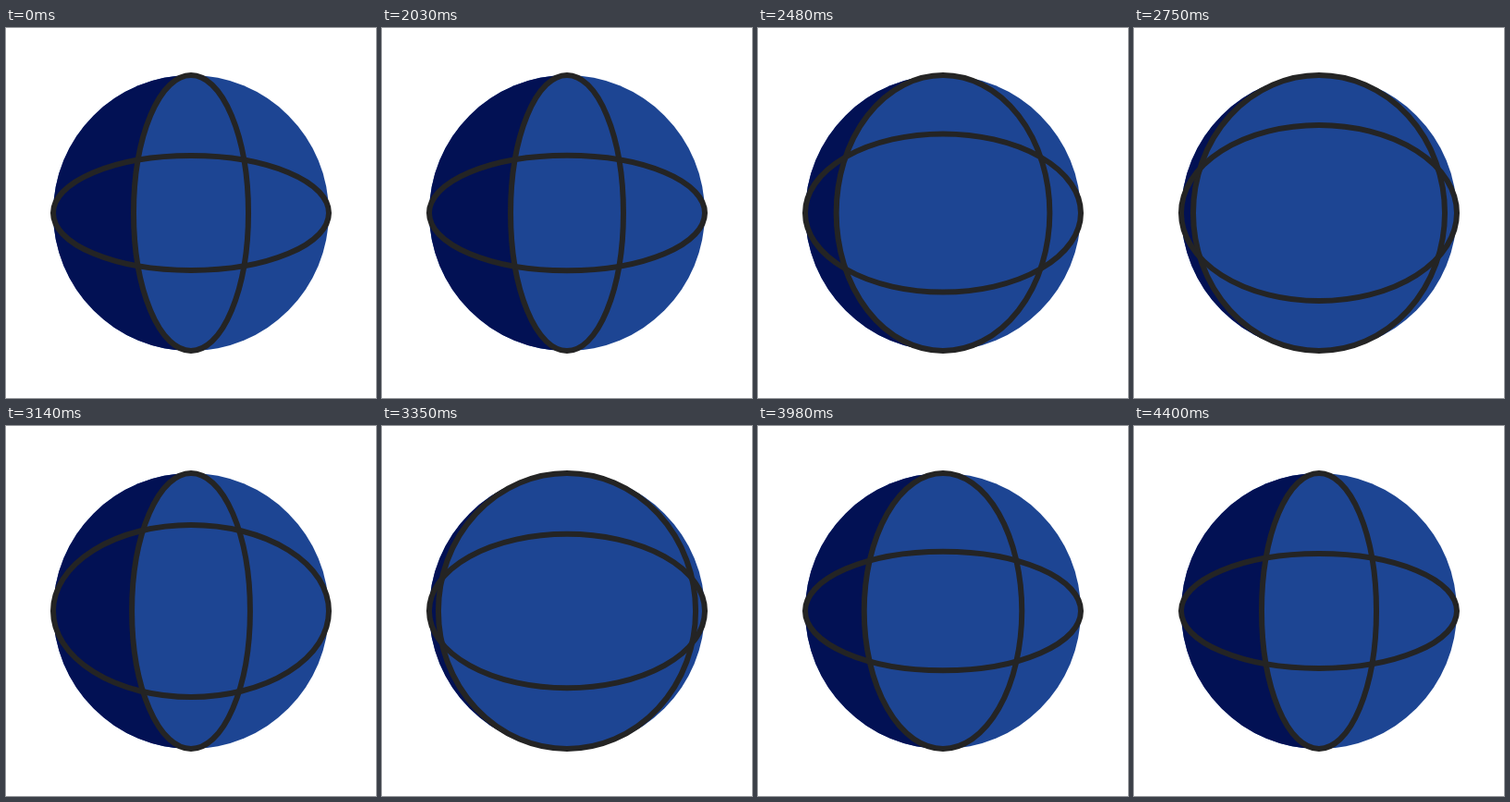
Animation, 400 px wide and 400 px high, one loop 4430 ms. Source, as an HTML page with a canvas:

```html
<!DOCTYPE html>
<html lang="en">
<head>
<meta charset="utf-8">
<title>Turning globe</title>
<style>
  html, body { margin: 0; width: 100%; height: 100%; overflow: hidden; background: #fff; }
  canvas { display: block; }
</style>
</head>
<body>
<canvas id="stage" width="400" height="400"></canvas>
<script>
const ctx = document.getElementById('stage').getContext('2d');

const LOOP = 4430, MOVE_START = 2000, STEP = 30, STEPS = 80;
const CENTER = 200, RADIUS = 149, LINE = 6;
const NIGHT = '#021154', DAY = '#1d4593', INK = '#242424';
const REST_ANGLE = 24.6, REST_TILT = 62;

// Each key: [step, value, slope per step]
const SPIN = [[0, 0, 0], [9, 30.4, 6], [25, 138.7, 7.2], [38, 230, 6.5], [54, 317.8, 3.8], [80, 360, 0]];
const TILT = [[0, 0, 0], [9, 12.5, 1.7], [25, 33, 0.6], [38, 31, -1], [54, 9, -0.8], [80, 0, 0]];

// Cubic Hermite curve through the keys
function sample(keys, step) {
  let i = 0;
  while (i < keys.length - 2 && step > keys[i + 1][0]) i++;
  const [x0, y0, m0] = keys[i], [x1, y1, m1] = keys[i + 1];
  const span = x1 - x0, u = (step - x0) / span, v = 1 - u;
  return y0 * v * v * (1 + 2 * u) + y1 * u * u * (3 - 2 * u)
    + span * u * v * (m0 * v - m1 * u);
}

function ellipse(rx, ry, from = 0, to = 2 * Math.PI) {
  ctx.beginPath();
  ctx.ellipse(CENTER, CENTER, rx, ry, 0, from, to);
}

function fill(color) {
  ctx.fillStyle = color;
  ctx.fill();
}

function draw(time) {
  const step = Math.max(0, Math.min(STEPS, Math.floor((time - MOVE_START) / STEP)));
  const angle = (REST_ANGLE - sample(SPIN, step)) * Math.PI / 180;
  const width = RADIUS * Math.abs(Math.sin(angle));
  const height = REST_TILT + sample(TILT, step);

  ctx.fillStyle = '#fff';
  ctx.fillRect(0, 0, 400, 400);
  ellipse(RADIUS, RADIUS);
  fill(DAY);
  ellipse(RADIUS, RADIUS, Math.PI / 2, Math.PI * 1.5);
  fill(NIGHT);

  ctx.strokeStyle = INK;
  ctx.lineWidth = LINE;
  ellipse(width, RADIUS);
  fill(DAY);
  ctx.stroke();
  ellipse(RADIUS, height);
  ctx.stroke();
}

const start = performance.now();
function tick() {
  draw((performance.now() - start) % LOOP);
  requestAnimationFrame(tick);
}
tick();
</script>
</body>
</html>
```
